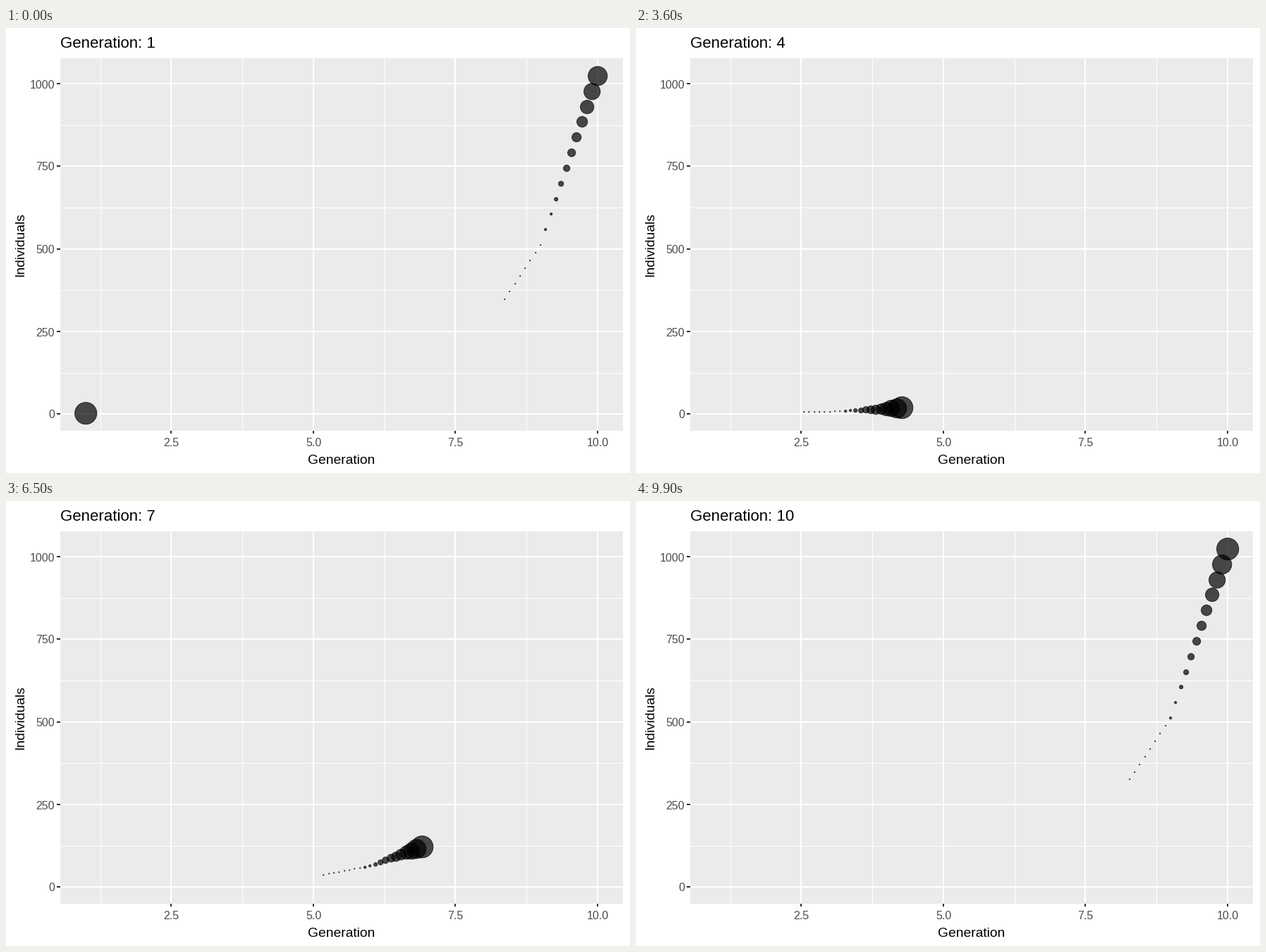
A matplotlib script that plays this animation: 885x632 px, repeating every 10 s.

```python
import numpy as np
import matplotlib.pyplot as plt
from matplotlib.animation import FuncAnimation
from matplotlib.patches import Rectangle

W, H, DPI = 885, 632, 64
PT = 72 / DPI                      # points per pixel
FRAMES, STEPS, WAKE = 100, 11, 20  # STEPS frames per generation
LEFT, RIGHT, TOP, BOTTOM = 77, 875, 43, 572

plt.rcParams["font.family"] = "Liberation Sans"
fig = plt.figure(figsize=(W / DPI, H / DPI), dpi=DPI, facecolor="white")
ax = fig.add_axes([0, 0, 1, 1])
ax.set_xlim(0, W)
ax.set_ylim(H, 0)
ax.axis("off")


def px(gen):
    return np.floor(113.35 + 80.6 * (gen - 1) + 0.5)


def py(count):
    return np.floor(548.4 - 0.4693 * count + 0.5)


def box(x, y, w, h, color):
    ax.add_patch(Rectangle((x, y), w, h, fc=color, lw=0, antialiased=False))


def label(x, y, text, size, color="black", **kw):
    return ax.text(x, y, text, fontsize=size * PT, color=color,
                   va="baseline", **kw)


# Panel, grid and axes
box(LEFT, TOP, RIGHT - LEFT, BOTTOM - TOP, "#EBEBEB")
for gen in (1.25, 3.75, 6.25, 8.75):
    box(px(gen), TOP, 1, BOTTOM - TOP, "white")
for count in (125, 375, 625, 875):
    box(LEFT, py(count), RIGHT - LEFT, 1, "white")
for gen in (2.5, 5.0, 7.5, 10.0):
    x = px(gen)
    box(x - 1, TOP, 2, BOTTOM - TOP, "white")
    box(x - 1, BOTTOM, 2, 4, "#333333")
    label(x + 0.5, 594, f"{gen:.1f}", 16, "#4D4D4D", ha="center")
for count in (0, 250, 500, 750, 1000):
    y = py(count)
    box(LEFT, y - 1, RIGHT - LEFT, 2, "white")
    box(LEFT - 5, y - 1, 5, 2, "#333333")
    label(69, y + 6.5, str(count), 16, "#4D4D4D", ha="right")

label(476, 619, "Generation", 19.3, ha="center")
label(25, 307.5, "Individuals", 19.3, ha="center",
      rotation=90, rotation_mode="anchor")
title = label(LEFT, 28, "", 22.3)

# The leading dot and its shrinking wake, which wraps around the loop
age = np.arange(WAKE)
radius = np.maximum(1, np.floor(15.4 * (1 - age / WAKE) ** 3 + 1))
ink = (0, 0, 0, 0.7)
dots = ax.scatter(np.zeros(WAKE), np.zeros(WAKE),
                  s=((2 * radius - 0.8) * PT) ** 2,
                  facecolors=[ink], edgecolors=[ink], linewidths=PT, zorder=3)


def update(i):
    gen = 1 + ((i - age) % FRAMES) / STEPS
    base = np.floor(gen)
    count = 2 ** base * (1 + gen - base)
    dots.set_offsets(np.column_stack([px(gen) + 0.2, py(count) + 0.2]))
    title.set_text(f"Generation: {round(1 + i / STEPS)}")
    return dots, title


anim = FuncAnimation(fig, update, frames=FRAMES, interval=100,
                     init_func=lambda: update(0), repeat=True, repeat_delay=0)
plt.show()
```
